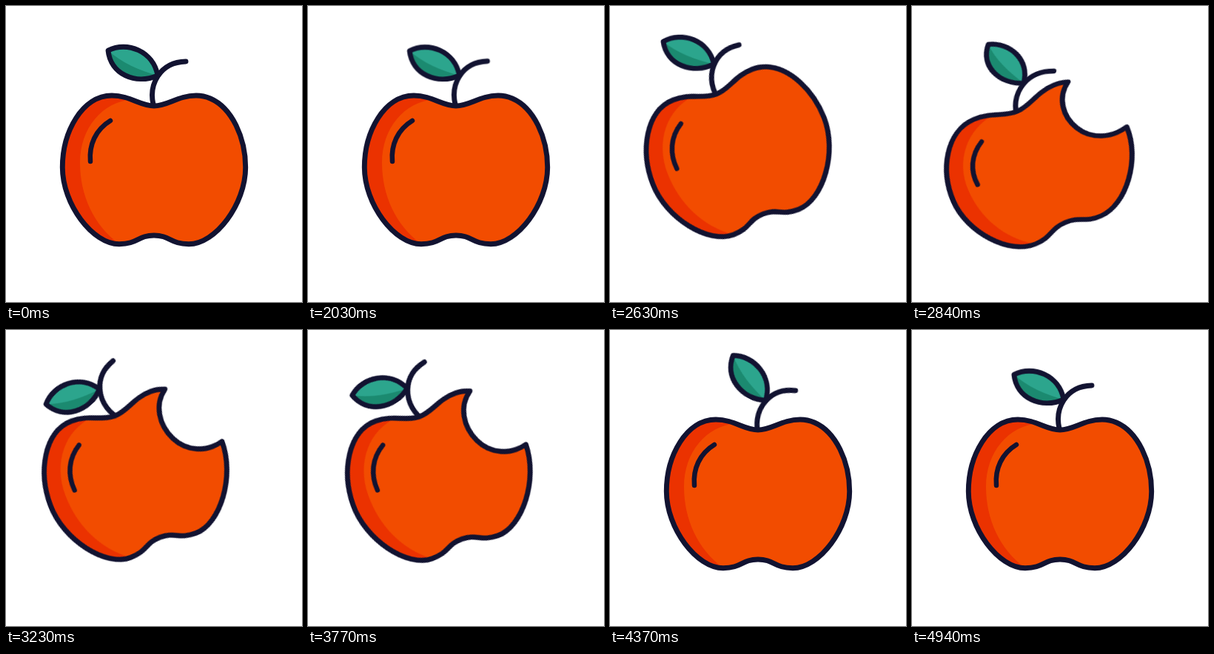
Recreate the animation shown at these times as an HTML page. Size 400 px wide and 400 px high, loop 4.97 s.

```html
<!DOCTYPE html>
<html lang="en">
<head>
<meta charset="utf-8">
<title>Apple bite</title>
<style>
  html, body { margin: 0; width: 100%; height: 100%; overflow: hidden; background: #fff; }
  svg { display: block; width: 100vw; height: 100vh; }

  .line { fill: none; stroke: #121331; stroke-width: 6.9; stroke-linecap: round; stroke-linejoin: round; }
  .thin { stroke-width: 6.5; }
  .flesh { fill: #f24c00; }
  .shade { fill: #eb3200; }

  .apple, .stem, .leaf, .skin { animation: 4970ms ease-in-out infinite; }
  .apple { transform-origin: 200px 216px; animation-name: apple; }
  .stem { transform-origin: 199px 132px; animation-name: stem; }
  .leaf { transform-origin: 205px 94px; animation-name: leaf; }
  .skin { animation-name: bite; }

  /* tilt, recoil from the bite, return with overshoot */
  @keyframes apple {
    0%, 40.7% { transform: translate(0, 0) rotate(0deg) scale(1, 1); }
    48.69% { transform: translate(-25.2px, -27px) rotate(-21.5deg) scale(1, 1); }
    51.7% { transform: translate(-27px, -24px) rotate(-21deg) scale(1, 1); }
    57.14% { transform: translate(-27.7px, -4.2px) rotate(-23.2deg) scale(1.03, .935); }
    61.57%, 74.65% { transform: translate(-24.7px, -24px) rotate(-20.5deg) scale(1, 1); }
    82.49% { transform: translate(10px, 10px) rotate(4deg) scale(1, 1); }
    86.5%, 100% { transform: translate(0, 0) rotate(0deg) scale(1, 1); }
  }

  @keyframes stem {
    0%, 40.4% { transform: rotate(0deg); }
    42.25% { transform: rotate(-4deg); }
    47.2% { transform: rotate(25deg); }
    51.7% { transform: rotate(8deg); }
    57.14% { transform: rotate(28deg); }
    63.98% { transform: rotate(-20deg); }
    68.81% { transform: rotate(8deg); }
    73.24% { transform: rotate(-6deg); }
    78.07% { transform: rotate(-15deg); }
    86.72% { transform: rotate(11deg); }
    90.95% { transform: rotate(-5deg); }
    94.16% { transform: rotate(3deg); }
    96.98% { transform: rotate(-1deg); }
    100% { transform: rotate(0deg); }
  }

  @keyframes leaf {
    0%, 40.85% { transform: rotate(0deg); }
    42.25% { transform: rotate(-3deg); }
    47.48% { transform: rotate(31deg); }
    52.1% { transform: rotate(8deg); }
    57.14% { transform: rotate(17.5deg); }
    63.98% { transform: rotate(-6deg); }
    68.81% { transform: rotate(9deg); }
    73.24% { transform: rotate(2deg); }
    78.5% { transform: rotate(-9deg); }
    86.72% { transform: rotate(24deg); }
    91.3% { transform: rotate(-9deg); }
    94.6% { transform: rotate(4deg); }
    97.4% { transform: rotate(-1deg); }
    100% { transform: rotate(0deg); }
  }

  @keyframes bite {
    0%, 53.9%, 81%, 100% {
      d: path("M200 135C219 135 232 121 257 121C263.8 121 270.2 122.4 276.2 125C290.8 131.3 302.6 144.6 310.9 161.3C319.1 178 323.7 198.1 323.7 218C323.7 268 283 321.7 247 321.7C222 321.7 222 310 200 310C178 310 178 321.7 153 321.7C117 321.7 76.3 268 76.3 218C76.3 170 103 121 143 121C168 121 181 135 200 135Z");
    }
    54.7%, 77.1% {
      d: path("M200 135C219 135 232 121 257 121C263.8 121 270.2 122.4 276.2 125C255.5 139.5 251.5 167.5 263 191C274.5 214.5 299.8 224.5 323.7 218C323.7 268 283 321.7 247 321.7C222 321.7 222 310 200 310C178 310 178 321.7 153 321.7C117 321.7 76.3 268 76.3 218C76.3 170 103 121 143 121C168 121 181 135 200 135Z");
    }
  }
</style>
</head>
<body>
<svg viewBox="0 0 400 400">
  <g class="apple">
    <g class="stem">
      <path class="line" d="M199 133C193 107 207 76 243 75"/>
      <g class="leaf">
        <path fill="#2ca58d" d="M138 60C164 47 199 61 205 94C175 107 141 92 138 60Z"/>
        <path fill="#1b8a70" d="M138 60C155 76 180 87 205 94C175 107 141 92 138 60Z"/>
        <path class="line" d="M138 60C164 47 199 61 205 94C175 107 141 92 138 60Z"/>
      </g>
    </g>
    <path class="skin flesh"/>
    <path class="shade" d="M170 126C160 122 150 121 143 121C103 121 76.3 170 76.3 218C76.3 268 117 321.7 153 321.7C118 296 100 255 100 212C100 165 130 130 170 126Z"/>
    <path class="skin line"/>
    <path class="line thin" d="M141 155C121 167 112 188 114 210"/>
  </g>
</svg>
</body>
</html>
```
